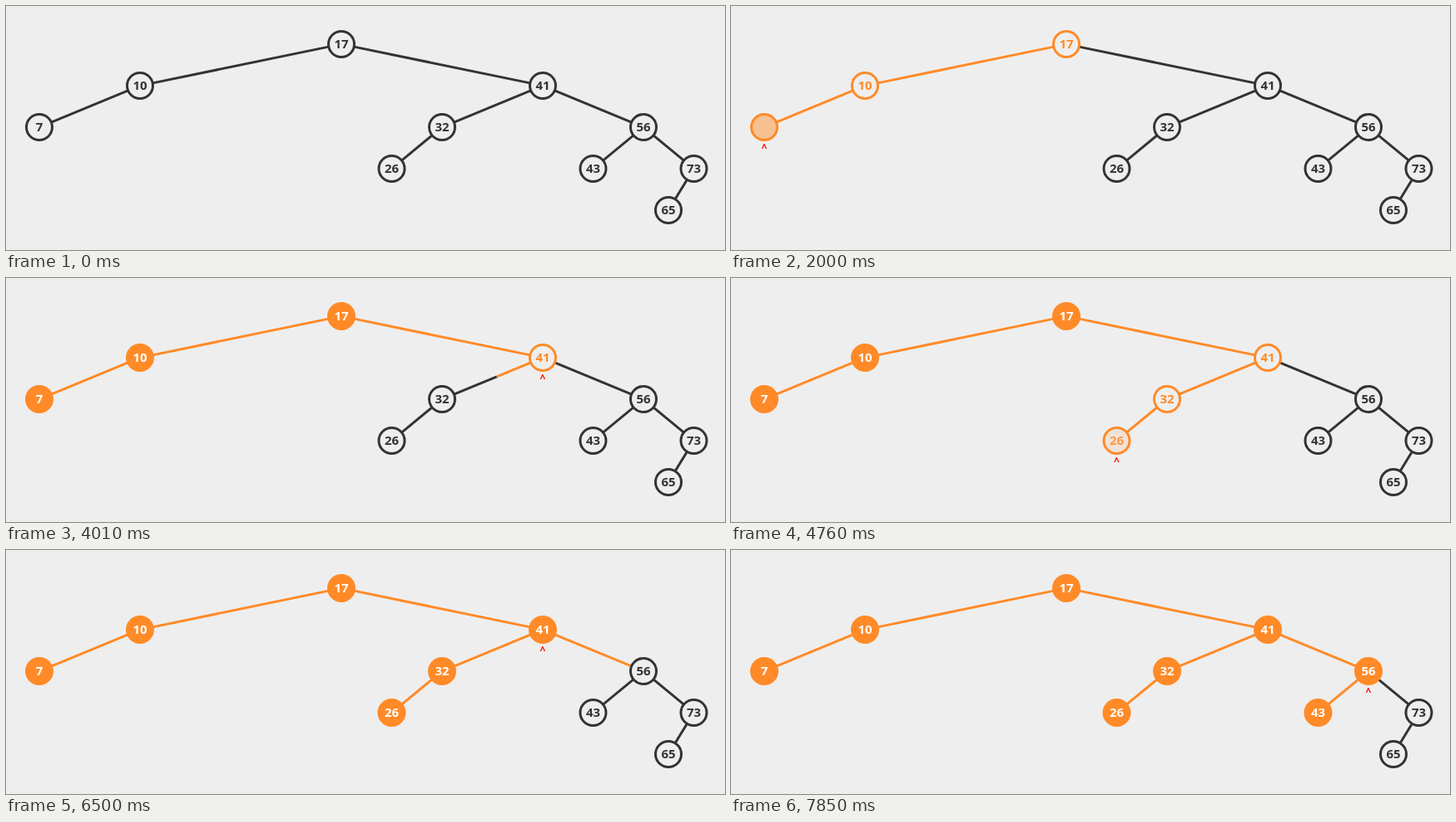
Animation, 864 px wide and 294 px high, one loop 8000 ms. Source, as an HTML page:

```html
<!DOCTYPE html>
<html lang="en">
<head>
<meta charset="utf-8">
<title>Inorder tree traversal</title>
<style>
  html, body { margin: 0; width: 100%; height: 100%; overflow: hidden; background: #eee; }
  svg { display: block; width: 864px; height: 294px; }
  line, circle { stroke-width: 3; }
  text { font: 700 15px "PT Sans", "Open Sans", "Noto Sans", sans-serif; text-anchor: middle; }
  .cursor { fill: #f00; }
</style>
</head>
<body>
<svg id="stage" viewBox="0 0 864 294"></svg>
<script>
const LOOP = 8000, EDGE_MS = 200, FADE_MS = 150, ROOT_LABEL_END = 920;
const PAPER = [238, 238, 238], INK = [51, 51, 51], ORANGE = [255, 138, 39], WHITE = [255, 255, 255];

// reach: outline turns orange; visit: disc fills
const nodes = [
  { key: 17, x: 403, y: 46, reach: 495, visit: 3122 },
  { key: 10, x: 161, y: 96, parent: 17, reach: 1315, visit: 2506 },
  { key: 7, x: 40, y: 146, parent: 10, reach: 1715, visit: 1928 },
  { key: 41, x: 645, y: 96, parent: 17, reach: 3715, visit: 5920 },
  { key: 32, x: 524, y: 146, parent: 41, reach: 4115, visit: 5326 },
  { key: 26, x: 463.5, y: 196, parent: 32, reach: 4515, visit: 4715 },
  { key: 56, x: 766, y: 146, parent: 41, reach: 6520, visit: 7697 },
  { key: 43, x: 705.5, y: 196, parent: 56, reach: 6920, visit: 7116 },
  { key: 73, x: 826.5, y: 196, parent: 56, reach: Infinity, visit: Infinity },
  { key: 65, x: 796, y: 246, parent: 73, reach: Infinity, visit: Infinity }
];

const stage = document.getElementById("stage");

function add(tag, attrs) {
  const el = document.createElementNS("http://www.w3.org/2000/svg", tag);
  set(el, attrs);
  return stage.appendChild(el);
}

function set(el, attrs) {
  for (const name in attrs) el.setAttribute(name, attrs[name]);
}

function progress(t, start, duration) {
  const p = Math.min(1, Math.max(0, (t - start) / duration));
  return p < 0.5 ? 4 * p ** 3 : 1 - 4 * (1 - p) ** 3;
}

const mix = (a, b, p) => a.map((v, i) => v + (b[i] - v) * p);
const rgb = c => `rgb(${c.map(Math.round)})`;

// Edges run from rim to rim.
for (const node of nodes.filter(n => n.parent)) {
  const from = nodes.find(n => n.key === node.parent);
  const length = Math.hypot(node.x - from.x, node.y - from.y);
  const at = d => [from.x + (node.x - from.x) * d / length, from.y + (node.y - from.y) * d / length];
  node.ends = [at(15.5), at(length - 15.5)];
  node.rest = add("line", { stroke: rgb(INK) });
  node.trail = add("line", { stroke: rgb(ORANGE) });
}

for (const node of nodes) {
  node.disc = add("circle", { cx: node.x, cy: node.y, r: 15.5 });
  node.label = add("text", { x: node.x, y: node.y + 5.4 });
  node.label.textContent = node.key;
}

const cursor = add("text", { class: "cursor" });

function drawLine(line, [x1, y1], [x2, y2], visible) {
  set(line, { x1, y1, x2, y2, visibility: visible ? "visible" : "hidden" });
}

function drawCursor(t) {
  let latest = -1, current = null;
  for (const node of nodes) {
    for (const time of [node.reach, node.visit]) {
      if (time <= t && time > latest) {
        latest = time;
        current = node;
      }
    }
  }
  cursor.textContent = !current ? "" : t < ROOT_LABEL_END ? "root" : "^";
  if (!current) return;
  const isWord = t < ROOT_LABEL_END;
  set(cursor, {
    x: current.x,
    y: current.y + (isWord ? 31 : 28.8),
    style: `font-size:${isWord ? 15 : 12}px`
  });
}

function render(t) {
  for (const node of nodes) {
    if (node.parent) {
      const p = progress(t, node.reach - EDGE_MS, EDGE_MS);
      const [start, end] = node.ends;
      const tip = mix(start, end, p);
      drawLine(node.trail, start, tip, p > 0);
      drawLine(node.rest, tip, end, p < 1);
    }
    const fill = progress(t, node.visit, FADE_MS);
    const outline = mix(INK, ORANGE, progress(t, node.reach, FADE_MS));
    set(node.disc, { stroke: rgb(outline), fill: rgb(mix(PAPER, ORANGE, fill)) });
    set(node.label, { fill: rgb(mix(outline, WHITE, fill)) });
  }
  drawCursor(t);
}

const began = performance.now();
function tick() {
  render((performance.now() - began) % LOOP);
  requestAnimationFrame(tick);
}
tick();
</script>
</body>
</html>
```
